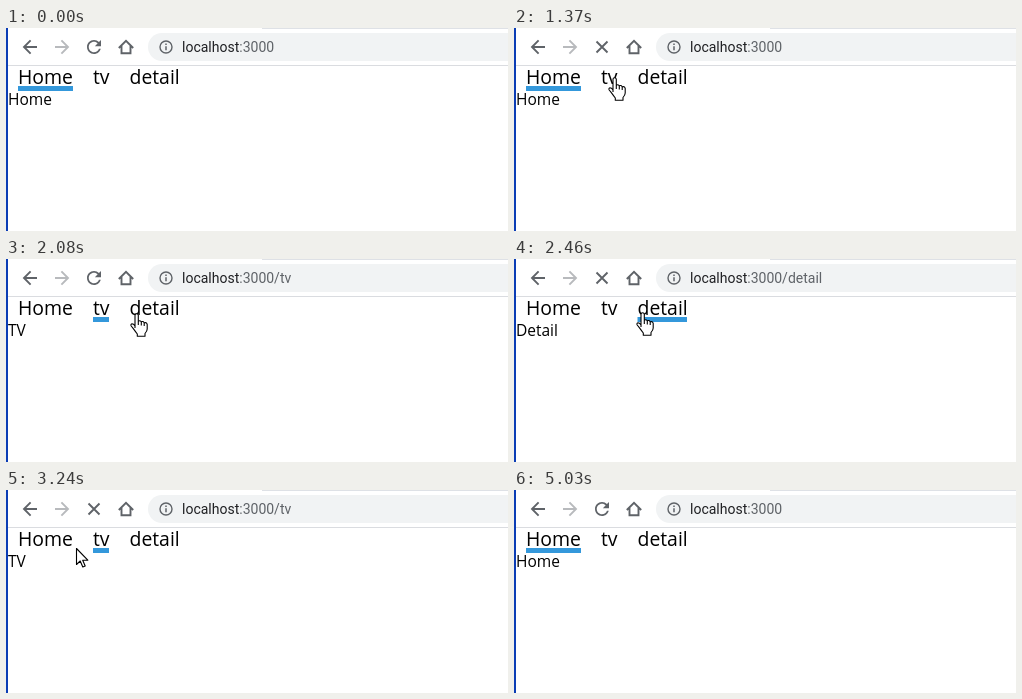
An HTML page for the animation above (5.12 s loop, 502 px wide and 203 px high).

```html
<!DOCTYPE html>
<html lang="en">
<head>
<meta charset="utf-8">
<title>Tab navigation</title>
<style>
html, body { margin: 0; width: 100%; height: 100%; overflow: hidden; background: #fff; }
svg { display: block; }
.icon { fill: none; stroke: #5f6368; stroke-width: 1.9; }
.url { font: 14px Roboto, sans-serif; fill: #202124; }
.url .path { fill: #5f6368; }
.nav { font: 19.4px "Open Sans", sans-serif; }
.body { font: 15.5px "Open Sans", sans-serif; }
.pointer { fill: #fff; stroke: #000; stroke-width: 1.1; stroke-linejoin: round; }
</style>
</head>
<body>
<svg width="502" height="203" viewBox="0 0 502 203">
  <path d="M256 0H502V1H256Z" fill="#dee1e6"/>
  <path d="M2 37H502V38H2Z" fill="#dadce0"/>
  <rect x="142" y="5" width="400" height="28" rx="14" fill="#f1f3f4"/>
  <path d="M0 0H2V203H0Z" fill="#0b3db5"/>

  <g class="icon">
    <path d="M31 19H18.5M24.6 12.4L18 19l6.6 6.6"/>
    <path d="M49 19H61.5M55.4 12.4L62 19l-6.6 6.6" stroke="#b8babd"/>
    <path id="stop" d="M82.5 13.5l11 11m0-11l-11 11"/>
    <path d="M112.8 20L120 12.9l7.2 7.1M115.5 18v7.2h9V18"/>
    <circle cx="160" cy="19" r="6" stroke-width="1.4"/>
    <path d="M160 18.3v4M160 15.5v1.6" stroke-width="1.5"/>
  </g>
  <path id="reload" fill="#5f6368" transform="translate(77.5 8.5) scale(.875)" d="M17.65 6.35C16.2 4.9 14.21 4 12 4c-4.42 0-7.99 3.58-7.99 8s3.57 8 7.99 8c3.73 0 6.84-2.55 7.73-6h-2.08c-.82 2.33-3.04 4-5.65 4-3.31 0-6-2.69-6-6s2.69-6 6-6c1.66 0 3.14.69 4.22 1.78L13 11h7V4z"/>

  <text class="url" x="176" y="24">localhost<tspan class="path" id="path"></tspan></text>
  <g class="nav">
    <text x="12" y="56">Home</text>
    <text x="87" y="56">tv</text>
    <text x="123.5" y="56">detail</text>
  </g>
  <rect id="underline" y="58" height="5" fill="#3498db"/>
  <text id="content" class="body" x="2" y="77"></text>

  <path id="arrow" class="pointer" d="M.5 .5V16.5L4.2 13L6.8 19L9.2 18L6.7 12.2H11.8Z"/>
  <path id="hand" class="pointer" d="M5 15V2.3Q5 .7 6.6 .7T8.3 2.3V8.2Q10 6.9 11.3 8.9Q13 7.8 14.2 9.9Q16.5 9 17.2 11.3V16Q17.2 18 15 20.5V23.3H7.3V21Q5.5 18.5 3.5 15.8L1.2 13Q.3 11.5 2 10.8Q3.5 10.8 5 13M8.3 8V12M11.3 9V12.5M14.2 10V13"/>
</svg>
<script>
const LOOP = 5120;
const el = id => document.getElementById(id);

const pages = {
  home: { path: ':3000', text: 'Home', x: 12, width: 55 },
  tv: { path: ':3000/tv', text: 'TV', x: 87, width: 16 },
  detail: { path: ':3000/detail', text: 'Detail', x: 123.5, width: 49.5 }
};

// Each track lists [start time, values...]; a value holds until the next entry.
const routes = [[0, 'home'], [1380, 'tv'], [2310, 'detail'], [3150, 'tv'], [3930, 'home']];
const contents = [[0, 'home'], [1460, 'tv'], [2460, 'detail'], [3240, 'tv'], [4010, 'home']];
const loading = [[0, false], [1300, true], [1850, false], [2310, true], [2770, false],
  [3150, true], [3540, false], [3790, true], [4160, false]];

// Pointer shape and its left top corner.
const pointer = [
  [0, ''],
  [680, 'arrow', 0, 9], [760, 'arrow', 8, 12], [840, 'arrow', 18, 16], [910, 'arrow', 30, 22],
  [990, 'arrow', 52, 32], [1070, 'hand', 82, 41], [1140, 'hand', 102, 44],
  [1220, 'hand', 97, 47], [1300, 'hand', 94, 49], [1460, 'hand', 97, 51],
  [1540, 'hand', 110, 54], [1610, 'hand', 127, 58], [1690, 'hand', 140, 60],
  [1770, 'hand', 139, 60], [1850, 'hand', 136, 59], [1930, 'hand', 132, 57],
  [2000, 'hand', 128, 55], [2080, 'hand', 124, 54], [2160, 'hand', 122, 53],
  [2540, 'hand', 120, 53], [2620, 'hand', 114, 53], [2690, 'hand', 106, 53],
  [2770, 'hand', 98, 53], [2850, 'hand', 92, 53], [2920, 'hand', 89, 53], [3000, 'hand', 89, 52],
  [3150, 'hand', 87, 54], [3240, 'arrow', 70, 58], [3320, 'arrow', 60, 65],
  [3390, 'arrow', 53, 66], [3470, 'hand', 45, 59], [3540, 'hand', 41, 54], [3620, 'hand', 38, 50],
  [4330, 'arrow', 108, 91], [4400, '']
];

const at = (track, t) => track.findLast(([start]) => start <= t).slice(1);
const show = (id, on) => el(id).setAttribute('visibility', on ? 'visible' : 'hidden');

function draw(now) {
  const t = now % LOOP;
  const page = pages[at(routes, t)[0]];
  el('path').textContent = page.path;
  el('underline').setAttribute('x', page.x);
  el('underline').setAttribute('width', page.width);
  el('content').textContent = pages[at(contents, t)[0]].text;

  const [busy] = at(loading, t);
  show('stop', busy);
  show('reload', !busy);

  const [shape, x, y] = at(pointer, t);
  for (const id of ['arrow', 'hand']) show(id, id === shape);
  if (shape) el(shape).setAttribute('transform', `translate(${x} ${y})`);
}

const begin = performance.now();
function tick() {
  draw(performance.now() - begin);
  requestAnimationFrame(tick);
}
tick();
</script>
</body>
</html>
```
